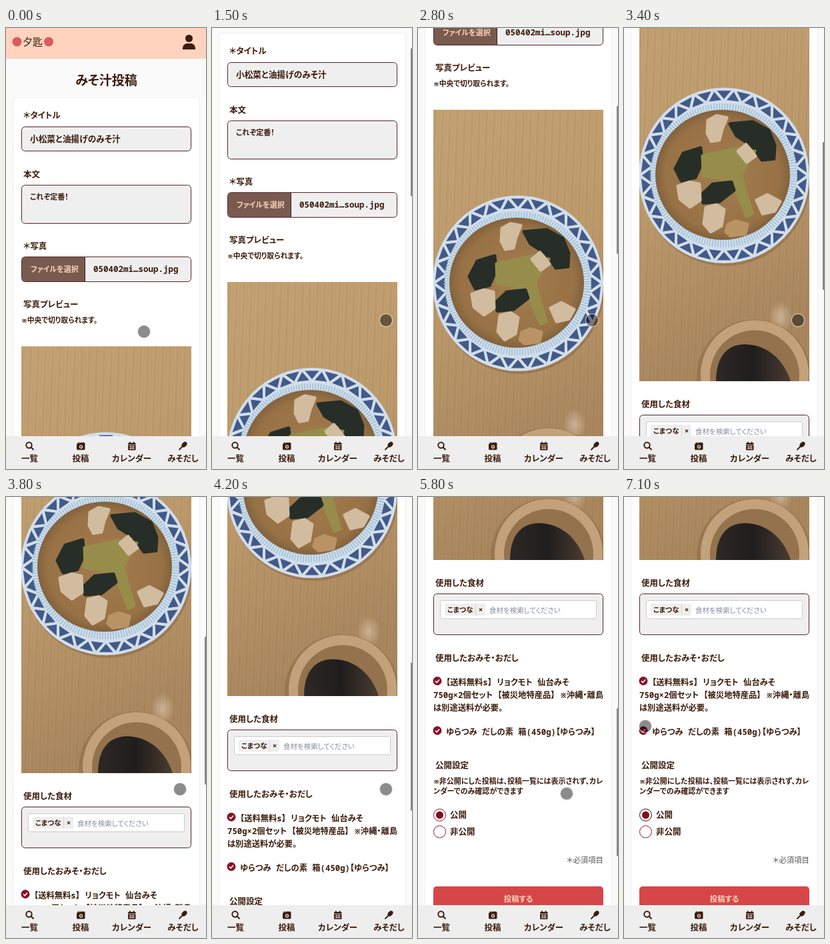
An HTML page that plays this animation: 300x658 px, repeating every 7200 ms.

```html
<!DOCTYPE html>
<html lang="ja">
<head>
<meta charset="utf-8">
<title>みそ汁投稿</title>
<style>
@property --scroll { syntax: '<number>'; inherits: true; initial-value: 0; }
html, body { margin: 0; width: 100%; height: 100%; overflow: hidden; background: #fafafa; }
svg { display: block; width: 300px; height: 658px; animation: scroll 7.2s infinite; }
text {
  font: 700 12.5px "Noto Sans Mono", "Noto Sans CJK JP", "Noto Sans CJK", monospace;
  font-feature-settings: "palt";
  fill: #3b1c0c;
}
.page { transform: translateY(calc(var(--scroll) * -1px)); }
.thumb { transform: translateY(calc(var(--scroll) * .3346px - 2px)); animation: thumb 7.2s step-end infinite; }
.cursor { animation: cursor 7.2s infinite; }
.ring { animation: ring 7.2s step-end infinite; }
.h1 { font-size: 19px; }
.small { font-size: 11px; }
.field { font-size: 12.7px; font-weight: 600; }
.item { font-size: 12.3px; }
.mark { font-size: .85em; letter-spacing: -.15em; }
.peach { fill: #ffd3bd; }
.hint { font-size: 10.5px; font-weight: 500; fill: #858d9b; }
.note { font-size: 11.4px; font-weight: 500; fill: #555; }
.mid { text-anchor: middle; }
.end { text-anchor: end; }
.box { fill: #efefef; stroke: #55262c; }
.icon { fill: #3b1c0c; }
.line { fill: none; stroke: #3b1c0c; }
.leaf { fill: #272e28; stroke: #272e28; }
.tofu { fill: #d2bca0; stroke: #d2bca0; }
.stem { fill: #968d4b; stroke: #968d4b; }

/* steps() holds each pose for 100 ms */
@keyframes scroll {
  0% { --scroll: 0; animation-timing-function: step-end; }
  11.111% { --scroll: 0; animation-timing-function: steps(3); }
  15.277% { --scroll: 33; animation-timing-function: steps(4); }
  20.833% { --scroll: 96; animation-timing-function: steps(8); }
  31.944% { --scroll: 241; animation-timing-function: steps(5); }
  38.888% { --scroll: 353; animation-timing-function: steps(6); }
  47.222% { --scroll: 514; animation-timing-function: steps(8); }
  58.333% { --scroll: 744; animation-timing-function: steps(3); }
  62.5% { --scroll: 808; animation-timing-function: steps(4); }
  68.055% { --scroll: 870; animation-timing-function: steps(4); }
  73.611% { --scroll: 926; animation-timing-function: steps(4); }
  79.166%, 100% { --scroll: 947; }
}
@keyframes thumb {
  0% { opacity: 0; }
  12.499% { opacity: 1; }
  86.111%, 100% { opacity: 0; }
}
@keyframes cursor {
  0% { transform: translate(207px, 453px); animation-timing-function: steps(6); }
  8.333% { transform: translate(261px, 436px); animation-timing-function: step-end; }
  79.166% { transform: translate(261px, 436px); animation-timing-function: steps(6); }
  87.499% { transform: translate(33px, 475px); animation-timing-function: step-end; }
  91.666% { transform: translate(33px, 475px); animation-timing-function: steps(4); }
  97.222%, 100% { transform: translate(32px, 342px); }
}
@keyframes ring {
  0% { stroke: #961a30; }
  88.888%, 100% { stroke: #2b1512; }
}
</style>
</head>
<body>
<svg viewBox="0 0 300 658">
  <defs>
    <linearGradient id="wood" x1="0" y1="0" x2=".25" y2="1">
      <stop offset="0" stop-color="#c5a475"/>
      <stop offset=".5" stop-color="#bf9c6e"/>
      <stop offset="1" stop-color="#aa8860"/>
    </linearGradient>
    <linearGradient id="grain" gradientUnits="userSpaceOnUse" x1="0" y1="0" x2="11" y2=".4" spreadMethod="repeat">
      <stop offset="0" stop-color="#7a5426" stop-opacity="0"/>
      <stop offset=".35" stop-color="#7a5426" stop-opacity=".12"/>
      <stop offset=".6" stop-color="#7a5426" stop-opacity="0"/>
      <stop offset=".8" stop-color="#7a5426" stop-opacity=".08"/>
      <stop offset="1" stop-color="#7a5426" stop-opacity="0"/>
    </linearGradient>
    <radialGradient id="soup">
      <stop offset="0" stop-color="#a37d50"/>
      <stop offset=".85" stop-color="#987245"/>
      <stop offset="1" stop-color="#83623d"/>
    </radialGradient>
    <radialGradient id="glow">
      <stop offset="0" stop-color="#e6d6c4" stop-opacity=".55"/>
      <stop offset="1" stop-color="#e6d6c4" stop-opacity="0"/>
    </radialGradient>
    <linearGradient id="cup">
      <stop offset="0" stop-color="#2e2825"/>
      <stop offset=".5" stop-color="#1f1d1d"/>
      <stop offset="1" stop-color="#4a3c32"/>
    </linearGradient>
    <clipPath id="frame"><rect width="255" height="566"/></clipPath>
    <g id="check">
      <circle r="6.5" fill="#8a1029"/>
      <path d="M-3 0l2.2 2.3L3-2" fill="none" stroke="#fff" stroke-width="1.6"/>
    </g>
  </defs>

  <rect width="300" height="658" fill="#fafafa"/>

  <g class="page">
    <rect width="300" height="46" fill="#ffd3bd"/>
    <circle cx="16.5" cy="20.5" r="7" fill="#dc5a62"/>
    <circle cx="64" cy="20.5" r="7" fill="#dc5a62"/>
    <text x="25" y="26" style="font-size:15px;font-weight:500">夕匙</text>
    <circle class="icon" cx="274.5" cy="15.5" r="5.5"/>
    <path class="icon" d="M265 32v-2a7 7 0 0 1 7-7h5a7 7 0 0 1 7 7v2z"/>

    <text class="h1 mid" x="150.5" y="85">みそ汁投稿</text>
    <rect x="10.5" y="103.500" width="280" height="1600" rx="5" fill="#fff" stroke="#eee"/>

    <text x="26" y="135">＊タイトル</text>
    <rect class="box" x="23.500" y="147.500" width="254" height="36" rx="5"/>
    <text class="field" x="36" y="170">小松菜と油揚げのみそ汁</text>

    <text x="26" y="222.500">本文</text>
    <rect class="box" x="23.500" y="234.500" width="254" height="57" rx="5"/>
    <text class="small" x="36" y="255.500">これぞ定番！</text>
    <path d="M273 289.500l2.500-2.500" stroke="#888" stroke-width=".7"/>

    <text x="26" y="330">＊写真</text>
    <rect class="box" x="23.500" y="341.500" width="254" height="37" rx="5"/>
    <path d="M118.500 342v36H28a4 4 0 0 1-4-4V346a4 4 0 0 1 4-4z" fill="#785b4e"/>
    <path d="M118.500 342v36" stroke="#3f2020"/>
    <text class="small peach" x="37" y="364">ファイルを選択</text>
    <text x="131" y="364" style="font-weight:600">050402mi…soup.jpg</text>

    <text x="26" y="417">写真プレビュー</text>
    <text x="22" y="440" style="font-size:10.8px"><tspan class="mark">※</tspan>中央で切り取られます。</text>

    <g transform="translate(23 475)" clip-path="url(#frame)">
      <rect width="255" height="566" fill="url(#wood)"/>
      <rect width="255" height="566" fill="url(#grain)"/>
      <ellipse cx="129" cy="263" rx="128" ry="131" fill="#5d3f20" opacity=".25"/>
      <ellipse cx="127" cy="259" rx="128" ry="131" fill="#d3deeb"/>
      <path id="rim" fill="#415a89"/>
      <ellipse cx="126" cy="259" rx="104" ry="101" fill="none" stroke="#9bbfd5" stroke-width="13" stroke-dasharray="1.5 2.5"/>
      <ellipse cx="125" cy="258" rx="101" ry="97" fill="url(#soup)"/>
      <g transform="translate(-23 39)" stroke-width="5" stroke-linejoin="round">
        <path class="leaf" d="M159 143l34-3 24 13 9 22-1 20-18 2-16-22-22-14z"/>
        <path class="leaf" d="M77 210l12-23 26-8 2 22-10 22-21 5z"/>
        <path class="tofu" d="M126 138l13-7 15 3-7 17-4 16-12 2-6-12z"/>
        <path class="stem" d="M118 191l52-11 26 4-21 35 17 58-8 4-22-54-43-7z"/>
        <path class="tofu" d="M171 184l12-10 14 17-13 9z"/>
        <path class="leaf" d="M115 250l18-17 28-3 4 12-22 17-24 2z"/>
        <path class="tofu" d="M81 236l17-6 15 3 1 24-15 10-15-12z"/>
        <path class="tofu" d="M199 257l16-8 19 10-8 14-18 4z"/>
        <path class="tofu" d="M123 268l16-4 11 7-4 24-16 9-10-12z"/>
        <path d="M156 293l12-5 17 5-3 14-22 3-7-6z" fill="#b99364" stroke="#b99364"/>
      </g>
      <ellipse cx="212" cy="470" rx="18" ry="24" fill="url(#glow)"/>
      <circle cx="172" cy="560" r="86" fill="#66482b" opacity=".25"/>
      <circle cx="173" cy="556" r="81" fill="#c3a17b"/>
      <circle cx="173" cy="557" r="67" fill="#94724e"/>
      <path d="M115 566C115 526 135 511 158 511C190 511 216 532 227 566z" fill="url(#cup)"/>
    </g>

    <text x="26" y="1080">使用した食材</text>
    <rect class="box" x="23.500" y="1091.500" width="254" height="61" rx="5"/>
    <rect x="33.500" y="1101.500" width="234" height="27" rx="2" fill="#fff" stroke="#ccc"/>
    <rect x="40" y="1106" width="61" height="18" rx="2" fill="#efefef"/>
    <path d="M86.500 1106v18" stroke="#d6d6d6"/>
    <text x="44" y="1119" style="font-size:10.5px">こまつな</text>
    <text class="small mid" x="94" y="1119">×</text>
    <text class="hint" x="107" y="1119.500">食材を検索してください</text>

    <text x="26" y="1192">使用したおみそ・おだし</text>
    <use href="#check" x="29" y="1221.500"/>
    <text class="item" x="42" y="1227.500">【送料無料s】 リョクモト 仙台みそ</text>
    <text class="item" x="23" y="1246.500">750g×2個セット 【被災地特産品】 <tspan class="mark" dx="-1">※</tspan>沖縄・離島</text>
    <text class="item" x="23" y="1265.500">は別途送料が必要。</text>
    <use href="#check" x="29" y="1295.500"/>
    <text class="item" x="42" y="1301.500">ゆらつみ だしの素 箱(450g)【ゆらつみ】</text>

    <text x="26" y="1352">公開設定</text>
    <text class="small" x="22" y="1374.500"><tspan class="mark">※</tspan>非公開にした投稿は、投稿一覧には表示されず、カレ</text>
    <text class="small" x="23" y="1390">ンダーでのみ確認ができます</text>
    <circle class="ring" cx="32.500" cy="1421.500" r="9" fill="#fff"/>
    <circle cx="32.500" cy="1421.500" r="5.500" fill="#80101f"/>
    <text x="48" y="1426">公開</text>
    <circle cx="32.500" cy="1446.500" r="9" fill="#fff" stroke="#961a30"/>
    <text x="48" y="1451">非公開</text>

    <text class="note end" x="278" y="1493">＊必須項目</text>
    <rect x="23" y="1528" width="255" height="37" rx="5" fill="#d64649"/>
    <text class="peach mid" x="150.500" y="1550.500" style="font-size:11.4px">投稿する</text>
  </g>

  <rect class="thumb" x="298" width="3" height="221" rx="1.500" fill="#858585"/>

  <rect y="609" width="300" height="49" fill="#eee"/>
  <g class="line" stroke-width="2">
    <circle cx="34.500" cy="622.500" r="4.200"/>
    <path d="M37.500 625.500l4 4"/>
  </g>
  <g class="icon">
    <path d="M106 620.500h1.500v-2h3v2l1-2h5.500a1.500 1.500 0 0 1 1.500 1.500v8a1.500 1.500 0 0 1-1.500 1.500h-9.500a1.500 1.500 0 0 1-1.500-1.500z"/>
    <circle cx="112.500" cy="624.800" r="2.600" fill="#eee"/>
    <circle cx="112.500" cy="624.800" r="1.400"/>
    <rect x="183" y="619" width="11.500" height="11" rx="1.300"/>
    <path d="M185 617.500h1.800v2H185zM190.700 617.500h1.800v2h-1.800z"/>
    <path d="M183 622h11.500M184.500 625h8.500M184.500 627.700h8.500M187 623v6M190.500 623v6" stroke="#eee" stroke-width=".8"/>
    <ellipse cx="267.500" cy="621.500" rx="4.600" ry="3.300" transform="rotate(-45 267.500 621.500)"/>
    <path d="M265 624l-5 5" stroke="#3b1c0c" stroke-width="1.800" stroke-linecap="round"/>
  </g>
  <g class="mid">
    <text x="35.500" y="647">一覧</text>
    <text x="112" y="647">投稿</text>
    <text x="188.500" y="647">カレンダー</text>
    <text x="265.500" y="647">みそだし</text>
  </g>

  <circle class="cursor" r="9.700" fill="#000" fill-opacity=".45" stroke="#fff" stroke-opacity=".6" stroke-width="1.200"/>
</svg>
<script>
// Triangles around the bowl rim, pointing in and out by turns
const COUNT = 52;
const point = (i, r) => {
  const a = i / COUNT * 2 * Math.PI;
  return `${(127 + 128 * r * Math.cos(a)).toFixed(1)} ${(259 + 131 * r * Math.sin(a)).toFixed(1)}`;
};
let d = '';
for (let i = 0; i < COUNT; i++) {
  const [base, tip] = i % 2 ? [.97, .87] : [.86, .96];
  d += `M${point(i - .7, base)}L${point(i + .7, base)}L${point(i, tip)}z`;
}
document.getElementById('rim').setAttribute('d', d);
</script>
</body>
</html>
```
